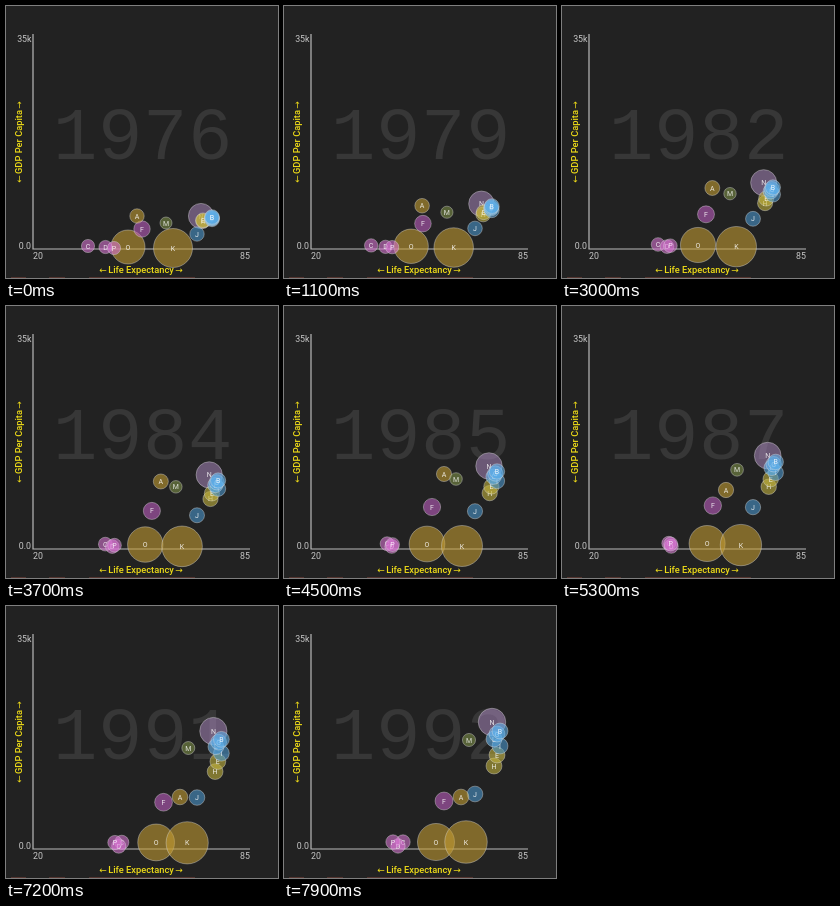
These frames come from a looping animation (272 by 272 pixels, 8000 ms). An HTML page:

```html
<!DOCTYPE html>
<html lang="en">
<head>
<meta charset="utf-8">
<title>Life expectancy and GDP</title>
<style>
  html, body { margin: 0; width: 100%; height: 100%; overflow: hidden; background: #222; }
  svg { display: block; width: 100%; height: 100%; }
  text { font-family: Roboto, "Open Sans", sans-serif; }
  .year { font: 74px "Liberation Mono", monospace; fill: #373737; text-anchor: middle; letter-spacing: .6px; }
  .tick { font-size: 8.8px; fill: #c8c8c8; }
  .title { font-size: 9.3px; font-weight: 500; fill: #eedb18; text-anchor: middle; }
  .arrow { font-family: "DejaVu Sans", sans-serif; font-size: 9px; }
  .axis { fill: none; stroke: #b9b9b9; stroke-width: 1.2; }
  .bubble circle { fill-opacity: .58; stroke: #ddd; stroke-opacity: .4; stroke-width: 1; }
  .bubble text { font-size: 7px; fill: #fff; fill-opacity: .85; text-anchor: middle; }
</style>
</head>
<body>
<svg viewBox="0 0 272 272">
  <rect width="272" height="272" fill="#222"/>
  <path d="M5 271.5H20M43 271.5H59M83 271.5H189" stroke="#54342f"/>
  <text class="year" id="year" x="137" y="153"></text>
  <path class="axis" d="M27 28V243H244"/>
  <g class="tick">
    <text x="25.5" y="36" text-anchor="end">35k</text>
    <text x="25" y="243" text-anchor="end">0.0</text>
    <text x="27" y="252.5">20</text>
    <text x="244" y="252.5" text-anchor="end">85</text>
  </g>
  <g class="title" transform="translate(135 266.5)">
    <text>Life Expectancy</text>
    <text class="arrow" x="-38">←</text>
    <text class="arrow" x="38">→</text>
  </g>
  <g class="title" transform="translate(15.5 136) rotate(-90)">
    <text>GDP Per Capita</text>
    <text class="arrow" x="-37">←</text>
    <text class="arrow" x="37">→</text>
  </g>
  <g id="bubbles"></g>
</svg>
<script>
const LOOP = 8, STEP = .1, MIDDLE = 4.5, END = 7.9;
const YEAR_LENGTH = .49, FIRST_YEAR = 1976.79;
const COLORS = {
  gold: '#c49e32', green: '#7d9148', yellow: '#c4b53e', purple: '#a082b4',
  magenta: '#c05fc3', pink: '#d975d4', blue: '#4a98cf', sky: '#5fb0ea'
};

const layer = document.getElementById('bubbles');
const yearText = document.getElementById('year');
const bubbles = [];

function add(parent, tag, attrs) {
  const node = document.createElementNS('http://www.w3.org/2000/svg', tag);
  for (const key in attrs) node.setAttribute(key, attrs[key]);
  return parent.appendChild(node);
}

// A path is a few points [seconds, x, y].
function bubble(label, color, radius, ...path) {
  const group = add(layer, 'g', { class: 'bubble' });
  const circle = add(group, 'circle', { fill: COLORS[color] });
  add(group, 'text', { y: 2.5 }).textContent = label;
  bubbles.push({ group, circle, radius, path });
}

bubble('O', 'gold', 17, [0, 122, 241], [MIDDLE, 143, 238], [END, 152, 236]);
bubble('K', 'gold', 19.5, [0, 167, 242], [MIDDLE, 178, 240], [END, 182, 236]);
bubble('N', 'purple', 12.6, [0, 195, 210], [MIDDLE, 205, 160], [END, 208, 116]);
bubble('F', 'magenta', 8.2, [0, 136, 223], [MIDDLE, 148, 201], [END, 160, 195]);
bubble('J', 'blue', 7.2, [0, 191, 228], [END, 191, 188]);
bubble('A', 'gold', 7.2, [0, 131, 210], [MIDDLE, 160, 168], [5.3, 164, 184], [6.5, 171, 191], [END, 177, 191]);
bubble('M', 'green', 6, [0, 160, 217], [MIDDLE, 172, 173], [END, 185, 134]);

// The poor countries close up along the bottom.
[...'CDP'].forEach((label, i) => bubble(label, 'pink', 6.6,
  [0, 82 + 22 * i - 4.5 * i * i, 240 + i],
  [END, 119 - 5 * i, 236 + 4 * (i % 2)]));

// The rich ones climb together and fan out.
[...'HEILGB'].forEach((label, i) => {
  const color = i < 2 ? 'yellow' : i < 3 ? 'blue' : 'sky';
  const x0 = color === 'yellow' ? 197 : 206, y0 = 215 - .8 * i;
  const x1 = 210 + 3 * (i % 3), y1 = 160 - 12 * i + i * i;
  bubble(label, color, 7.3,
    [0, x0, y0], [END / 2, (x0 + x1) / 2 + 1.5, (y0 + y1) / 2 + 4], [END, x1, y1]);
});

function pointAt(path, t) {
  const next = Math.max(1, path.findIndex(([time]) => time >= t));
  const [t0, x0, y0] = path[next - 1], [t1, x1, y1] = path[next];
  const part = (t - t0) / (t1 - t0);
  return [x0 + (x1 - x0) * part, y0 + (y1 - y0) * part];
}

function draw(seconds) {
  const t = Math.min(END, Math.floor(seconds % LOOP / STEP + 1e-6) * STEP);
  // The capital O stands in for a zero without a dot.
  yearText.textContent = String(Math.floor(FIRST_YEAR + t / YEAR_LENGTH)).replace('0', 'O');
  for (const { group, circle, radius, path } of bubbles) {
    const [x, y] = pointAt(path, t);
    group.setAttribute('transform', `translate(${x.toFixed(2)} ${y.toFixed(2)})`);
    circle.setAttribute('r', (radius * (1 + .09 * t / END)).toFixed(2));
  }
}

const start = performance.now();
function tick() {
  draw((performance.now() - start) / 1000);
  requestAnimationFrame(tick);
}
tick();
</script>
</body>
</html>
```
